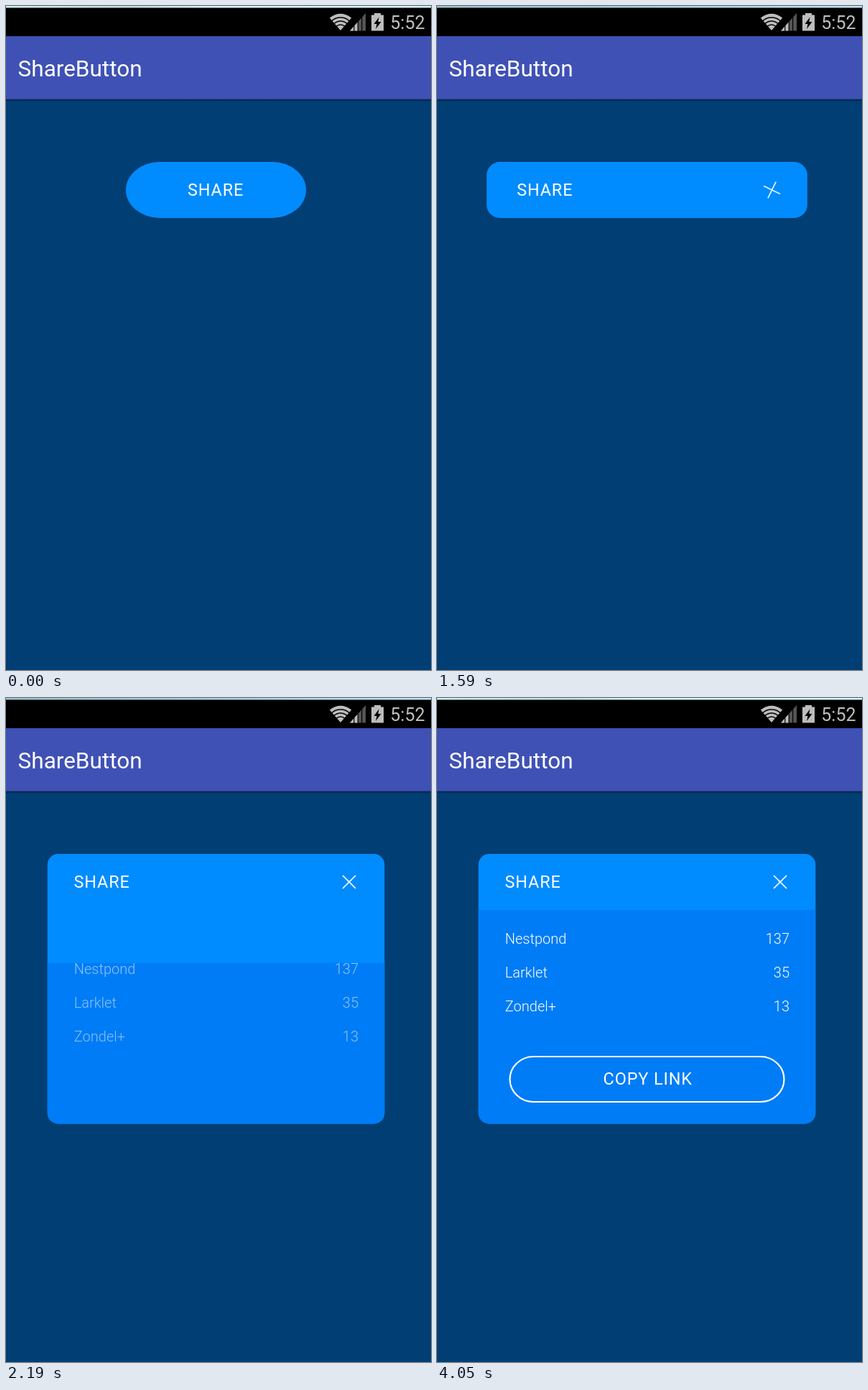
Animation of 592 by 924 pixels, one loop 4200 ms. Source, as an HTML page:

```html
<!DOCTYPE html>
<html lang="en">
<head>
<meta charset="utf-8">
<title>Share button</title>
<style>
  html, body { margin: 0; width: 100%; height: 100%; overflow: hidden; background: #003e74; }
  svg { display: block; width: 592px; height: 924px; font-family: Roboto, sans-serif; fill: #fff; }
  .caps { font-size: 23.4px; letter-spacing: .9px; }
  .rows { font-size: 20px; font-weight: 300; }
  .end { text-anchor: end; }
</style>
</head>
<body>
<svg viewBox="0 0 592 924">
  <defs>
    <linearGradient id="pale">
      <stop stop-color="#cdeeee"/><stop offset=".3" stop-color="#c4dfe2"/>
      <stop offset=".5" stop-color="#d6f8f8"/><stop offset="1" stop-color="#d3f3f6"/>
    </linearGradient>
    <linearGradient id="dusky">
      <stop stop-color="#9fc0c8"/><stop offset=".4" stop-color="#a9ccd6"/>
      <stop offset="1" stop-color="#c2e4ee"/>
    </linearGradient>
    <linearGradient id="shade" x2="0" y2="1">
      <stop stop-color="#000" stop-opacity=".45"/><stop offset="1" stop-color="#000" stop-opacity="0"/>
    </linearGradient>
    <clipPath id="cardClip"><rect id="card" y="217"/></clipPath>
  </defs>

  <rect width="592" height="924" fill="#003e74"/>
  <rect width="592" height="42" fill="#000"/>
  <rect id="strip" width="592" height="2.5"/>

  <g fill="#bdbdbd">
    <path d="M466 34L450.8 16.5Q466 5 481.2 16.5Z"/>
    <g fill="none" stroke="#000" stroke-width="1.5">
      <circle cx="466" cy="34" r="8"/><circle cx="466" cy="34" r="13"/><circle cx="466" cy="34" r="18"/>
    </g>
    <path d="M479 34.5H501V10Z" fill="#555"/>
    <path d="M479 34.5H490V22.2Z"/>
    <path d="M484.8 26V35M490.2 18V35M495.6 12V35" stroke="#000" stroke-width="1.2"/>
    <path d="M513 10H522V12.5H526V34.5H509V12.5H513Z"/>
    <path d="M519.5 15.5L512.5 25H516.5L515 32L522.5 22H518.3Z" fill="#000"/>
    <text x="535.3" y="32" font-size="25">5:52</text>
  </g>

  <rect y="42" width="592" height="88" fill="#3f51b5"/>
  <rect y="129.5" width="592" height="4" fill="url(#shade)"/>
  <text x="16.6" y="98" font-size="31.5">ShareButton</text>

  <g clip-path="url(#cardClip)">
    <rect x="50" y="210" width="490" height="400" fill="#008cff"/>
    <rect id="panel" x="50" width="490" height="400" fill="#007cf6"/>
    <g id="rows" class="rows"></g>
  </g>
  <text id="title" class="caps" y="264">SHARE</text>
  <path id="cross" d="M-9-9L9 9M9-9L-9 9" stroke="#fff" stroke-width="1.7"/>
  <g id="copy">
    <rect id="outline" y="499" height="63" rx="33" fill="none" stroke="#fff" stroke-width="2.2"/>
    <text class="caps" x="231.6" y="538">COPY LINK</text>
  </g>
</svg>
<script>
const LOOP = 4200, STEP = 30;
const $ = id => document.getElementById(id);
const set = (id, attrs) => {
  for (const key in attrs) $(id).setAttribute(key, attrs[key]);
};
const clamp = v => Math.min(1, Math.max(0, v));
const part = (t, start, length) => clamp((t - start) / length);
const ease = p => (1 - Math.cos(Math.PI * p)) / 2;
const mix = (a, b, p) => a + (b - a) * p;

$('rows').innerHTML = [['Nestpond', 137], ['Larklet', 35], ['Zondel+', 13]].map(([name, count], i) =>
  `<g><text x="94.8" y="${342 + 47 * i}">${name}</text>` +
  `<text class="end" x="491" y="${342 + 47 * i}">${count}</text></g>`).join('');

function draw(t) {
  const widen = ease(part(t, 1195, 500));
  const grow = ease(part(t, 1742, 400));
  const cover = ease(part(t, 1906, 425));
  const list = part(t, 2035, 416);
  const reveal = ease(part(t, 2248, 300));

  set('strip', { fill: `url(#${t >= 1050 && t < 4050 ? 'dusky' : 'pale'})` });

  const left = mix(167, 57.7, widen), right = mix(418, 527.3, widen);
  set('card', {
    x: left, width: right - left,
    height: mix(78, 375.5, grow),
    rx: mix(47, 15, widen)
  });
  set('panel', { y: t < 1906 ? 620 : mix(592.5, 295, cover) });
  set('title', { x: mix(253, 94.5, widen) });
  set('cross', {
    transform: `translate(${right - 49.3} 256) rotate(${mix(-180, 0, widen)})`,
    opacity: widen
  });

  set('rows', { transform: `translate(0 ${mix(60, 0, ease(list))})` });
  [...$('rows').children].forEach((row, i) =>
    row.setAttribute('opacity', clamp(list * 1.5 - .03 * i * (1 - list))));

  const width = mix(175, 382, reveal);
  set('outline', { x: 292.5 - width / 2, width });
  set('copy', { opacity: reveal });
}

function tick() {
  const t = performance.now() % LOOP;
  draw(Math.floor(t / STEP) * STEP);
  requestAnimationFrame(tick);
}
tick();
</script>
</body>
</html>
```
